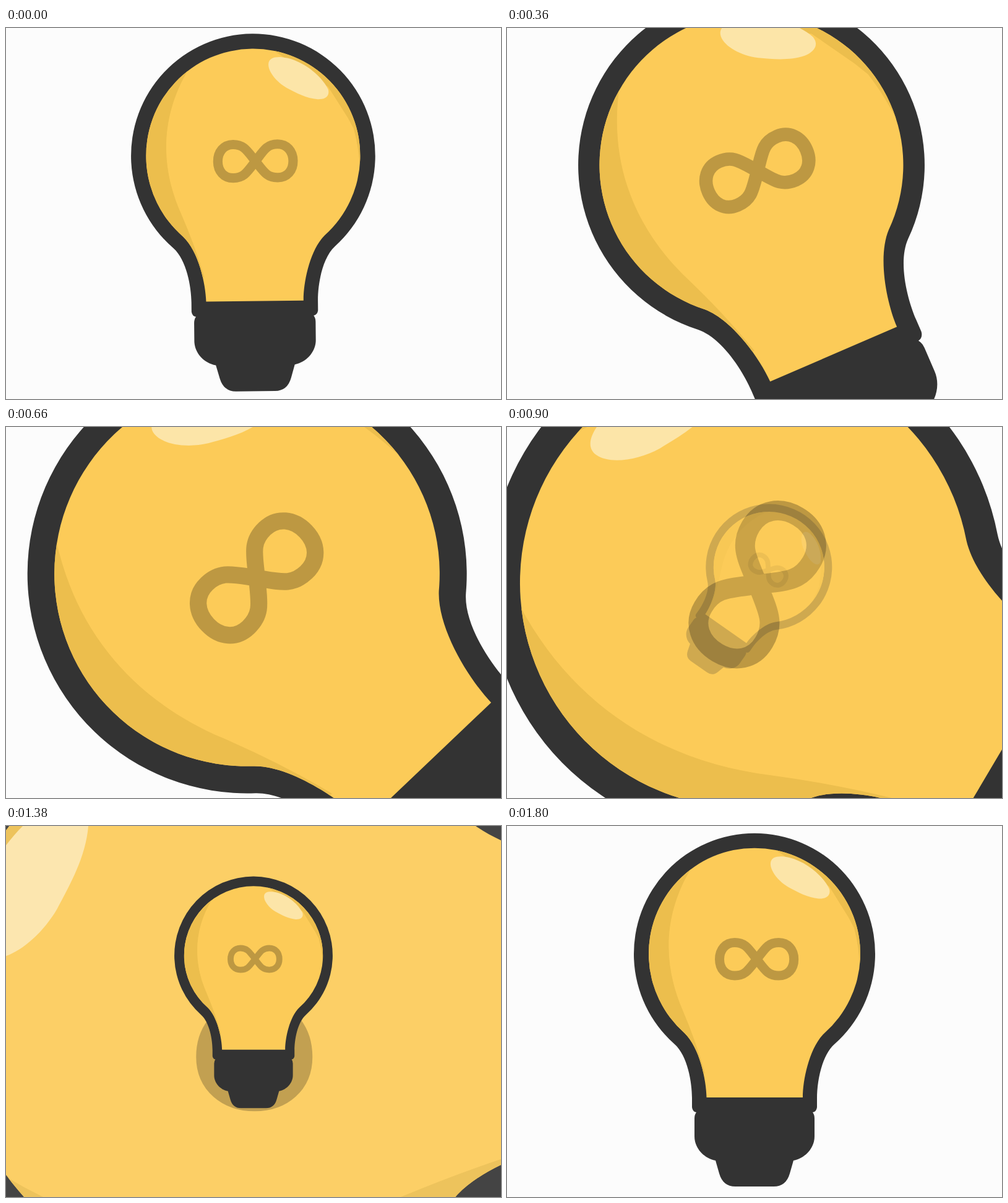
Write an HTML page that moves like this. It is 800 px wide and 600 px high and loops after 1830 ms.

```html
<!DOCTYPE html>
<html lang="en">
<head>
<meta charset="utf-8">
<title>Endless bulb</title>
<style>
  html, body { margin: 0; width: 100%; height: 100%; overflow: hidden; background: #fcfcfc; }
  svg { display: block; width: 100vw; height: 100vh; }
</style>
</head>
<body>
<svg viewBox="0 0 800 600">
  <defs>
    <path id="shell" fill="#333" d="M271 353A195 195 0 1 1 529 353C508 372 501 415 501 440V455Q500 462 494 463Q497 467 497 473V502C497 520 483 537 463 541L457 562Q451 583 431 583H369Q349 583 343 562L337 541C317 537 303 520 303 502V473Q303 467 306 463Q300 462 299 455V440C299 415 292 372 271 353Z"/>
    <path id="glass" d="M287 335A171 171 0 1 1 513 335C489 358 478 410 478 439H322.5C322 410 311 358 287 335Z"/>
    <clipPath id="inside"><use href="#glass"/></clipPath>
    <g id="bulb">
      <use href="#shell"/>
      <use href="#glass" fill="#fccb58"/>
      <g clip-path="url(#inside)" fill="#ecbe4d">
        <path d="M298 68C254 140 250 220 284 298Q306 350 320 400H200V68Z"/>
        <path d="M436 40L521 98L552 148L561 165Q569 195 571 235H600V20H436Z"/>
      </g>
      <path fill="#fce5a8" d="M426 60C427 48 442 48 456 51C485 58 512 82 521 102C524 114 514 118 504 117.5C486 116 470 107 455 99C438 89 425 72 426 60Z"/>
      <path fill="none" stroke="#000" stroke-opacity=".25" stroke-width="15" d="M403.7 215.5C390 198 385 188.5 368 188.5C353 188.5 343.5 200 343.5 215.5S353 242 368 242C385 242 390 233 403.7 215.5C417 198 422 188.5 439 188.5C454 188.5 463.7 200 463.7 215.5S454 242 439 242C422 242 417 233 403.7 215.5Z"/>
    </g>
  </defs>
  <use id="outer" href="#bulb"/>
  <use id="inner" href="#bulb"/>
</svg>
<script>
const LOOP = 1830, STEP = 30, PIVOT_X = 400, PIVOT_Y = 214.6;
const SETTLE = 45, LAST = 59; // the inner bulb stands upright, then fills the stage
const outer = document.getElementById('outer');
const inner = document.getElementById('inner');
const clamp = v => Math.min(1, Math.max(0, v));

function place(el, x, y, angle, scale, opacity) {
  el.setAttribute('transform',
    `translate(${x} ${y}) rotate(${angle}) scale(${scale}) translate(${-PIVOT_X} ${-PIVOT_Y})`);
  el.setAttribute('opacity', opacity);
}

function draw(now) {
  // the first pose is held for two steps
  const k = Math.max(0, Math.floor(now % LOOP / STEP) - 1);

  const turn = k < SETTLE ? 0.6 + 2.1 * k - 0.0025 * k * k : 90;
  place(outer, PIVOT_X - 0.5, PIVOT_Y + 1.58 * k, -turn, 1.012 + 0.0385 * k,
    1 - clamp((k - 44.1) / 10.4));

  const left = Math.max(0, SETTLE - k);
  const grow = clamp((k - SETTLE) / (LAST - SETTLE));
  place(inner, PIVOT_X + 1.31 * left, PIVOT_Y + 0.96 * left, 2.19 * left,
    0.656 - 0.0083 * left + 0.344 * grow, clamp((k - 24.5) / 20.5));

  requestAnimationFrame(draw);
}
requestAnimationFrame(draw);
</script>
</body>
</html>
```
